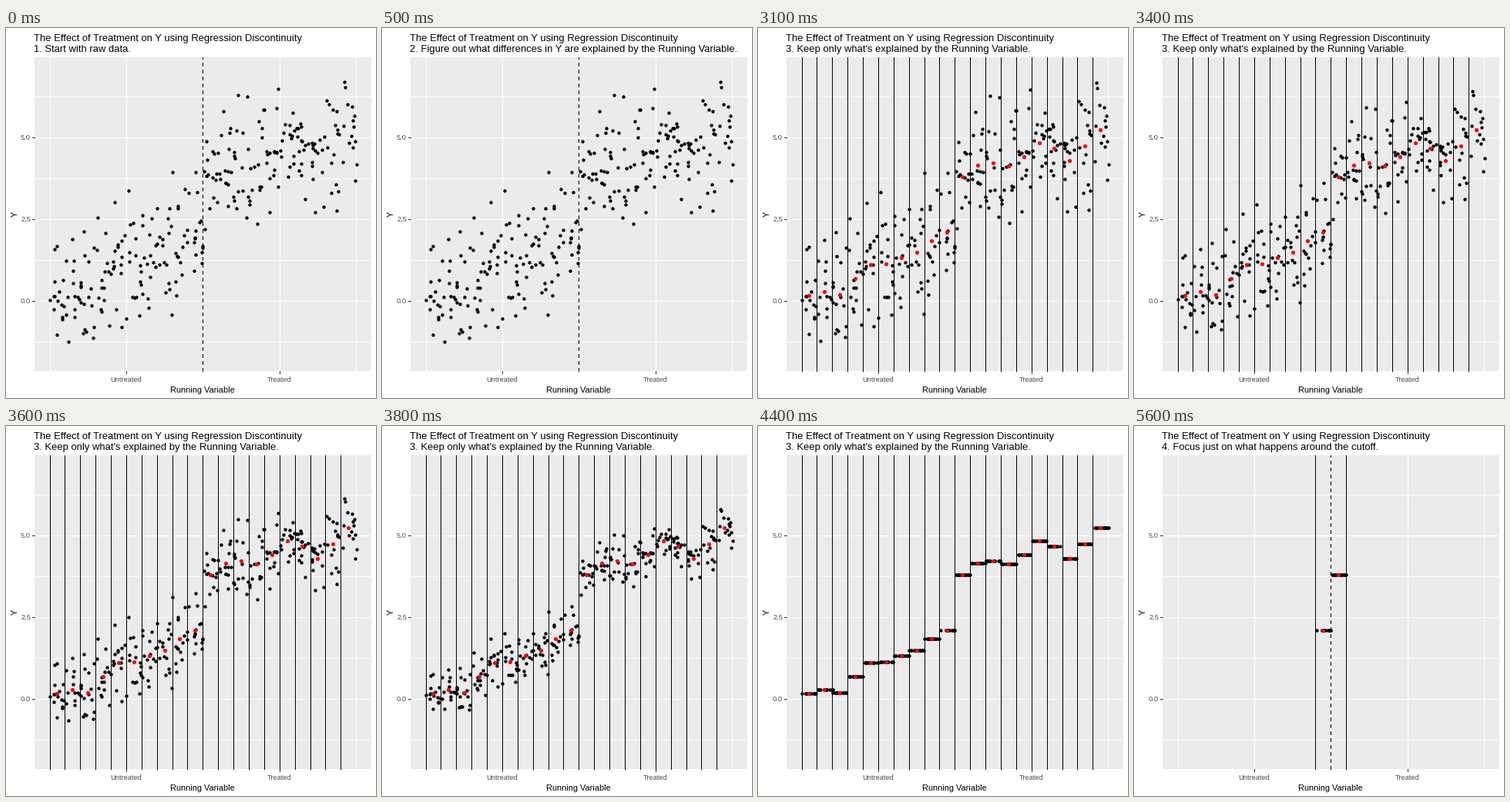
A matplotlib script for the animation above (8000 ms loop, 480 px wide and 480 px high).

```python
import math

import matplotlib.pyplot as plt
import numpy as np
from matplotlib.animation import FuncAnimation
from matplotlib.patches import Rectangle

plt.rcParams["font.family"] = "Liberation Sans"

SIZE, DPI = 480, 72
STEP_MS, FRAMES = 100, 80
LEFT, TOP, RIGHT, BOTTOM = 37, 38, 474, 445
X0, BIN_WIDTH, BINS, PER_BIN = 57.07, 19.88, 20, 15
Y0, UNIT = 353.5, 42.4
CUTOFF = 255

TITLE = "The Effect of Treatment on Y using Regression Discontinuity"
STEPS = [
    "1. Start with raw data.",
    "2. Figure out what differences in Y are explained by the Running Variable.",
    "3. Keep only what's explained by the Running Variable.",
    "4. Focus just on what happens around the cutoff.",
]

# Average of Y in each bin, before and after the cutoff.
UNTREATED = [0.15, 0.27, 0.18, 0.67, 1.1, 1.12, 1.31, 1.47, 1.83, 2.09]
TREATED = [3.79, 4.14, 4.21, 4.12, 4.4, 4.82, 4.66, 4.28, 4.72, 5.23]
bin_y = np.array(UNTREATED + TREATED)
bin_left = X0 + np.arange(BINS) * BIN_WIDTH
bin_x = bin_left + BIN_WIDTH / 2 - 0.6

rng = np.random.default_rng(7)
bin_of = np.repeat(np.arange(BINS), PER_BIN)
dot_x = bin_left[bin_of] + rng.uniform(0, BIN_WIDTH, BINS * PER_BIN)
noise = np.clip(rng.normal(0, 1, (BINS, PER_BIN)), -2.1, 2.1)
noise = (noise - noise.mean(axis=1, keepdims=True)).ravel()

fig = plt.figure(figsize=(SIZE / DPI, SIZE / DPI), dpi=DPI, facecolor="white")
ax = fig.add_axes([0, 0, 1, 1])
ax.set(xlim=(0, SIZE), ylim=(SIZE, 0))
ax.axis("off")


def to_row(y):
    return Y0 - UNIT * y


def line(x, y, color, z=1, **style):
    return ax.plot(x, y, color=color, lw=1, zorder=z, antialiased=False,
                   solid_capstyle="butt", dash_capstyle="butt", **style)[0]


def vertical(x, color, z=1, **style):
    return line([x, x], [BOTTOM, TOP], color, z, **style)


def markers(color, size, z):
    return ax.plot([], [], "o", color=color, ms=size, mew=0, zorder=z,
                   antialiased=False)[0]


def label(x, y, text, size, color="black", **style):
    style = {"ha": "center", "va": "baseline", **style}
    return ax.text(x, y, text, fontsize=size, color=color, **style)


ax.add_patch(Rectangle((LEFT, TOP), RIGHT - LEFT, BOTTOM - TOP,
                       fc="#EBEBEB", lw=0, zorder=0))
for y in np.arange(-1.25, 6.3, 1.25):
    row = math.floor(to_row(y)) + 1
    line([LEFT, RIGHT], [row, row], "white")
    if y in (0, 2.5, 5):
        line([34, LEFT], [row, row], "#333333")
        label(32, row + 3.3, f"{y:.1f}", 9.2, "#4D4D4D", ha="right")
for i in range(5):
    vertical(math.floor(57 + 99.35 * i), "white")
for x, text in ((156, "Untreated"), (355, "Treated")):
    line([x, x], [BOTTOM, 448], "#333333")
    label(x - 0.3, 459, text, 9.3, "#4D4D4D")
label(255, 473, "Running Variable", 11)
label(11.5, 241.5, "Y", 11, rotation=90, va="center")
label(36.5, 17, TITLE, 13.03, ha="left")
subtitle = label(36.5, 31, "", 13.03, ha="left")

dots = markers("black", 4.4, 2)
edges = [vertical(math.floor(x), "black", 3) for x in bin_left]
cutoff = vertical(CUTOFF, "black", 3, ls=(0, (4, 4)))
means = markers("red", 5.2, 4)


def update(frame):
    t = frame * STEP_MS
    subtitle.set_text(STEPS[(t >= 500) + (t >= 3100) + (t >= 5600)])
    binned, focused = t >= 1000, t >= 5600

    progress = min(max((t - 3000) / 1400, 0), 1)
    spread = (1 + math.cos(math.pi * progress)) / 2
    dot_y = to_row(bin_y[bin_of] + noise * spread)

    near = [9, 10] if focused else list(range(BINS))
    keep = np.isin(bin_of, near)
    dots.set_data(dot_x[keep], dot_y[keep])
    shown = near if binned else []
    means.set_data(bin_x[shown], to_row(bin_y[shown]))

    for i, edge in enumerate(edges):
        edge.set_visible(i in (9, 11) if focused else binned)
    cutoff.set_visible(focused or not binned)
    return [subtitle, dots, means, cutoff, *edges]


anim = FuncAnimation(fig, update, frames=FRAMES, interval=STEP_MS,
                     repeat=True, repeat_delay=0)
plt.show()
```
